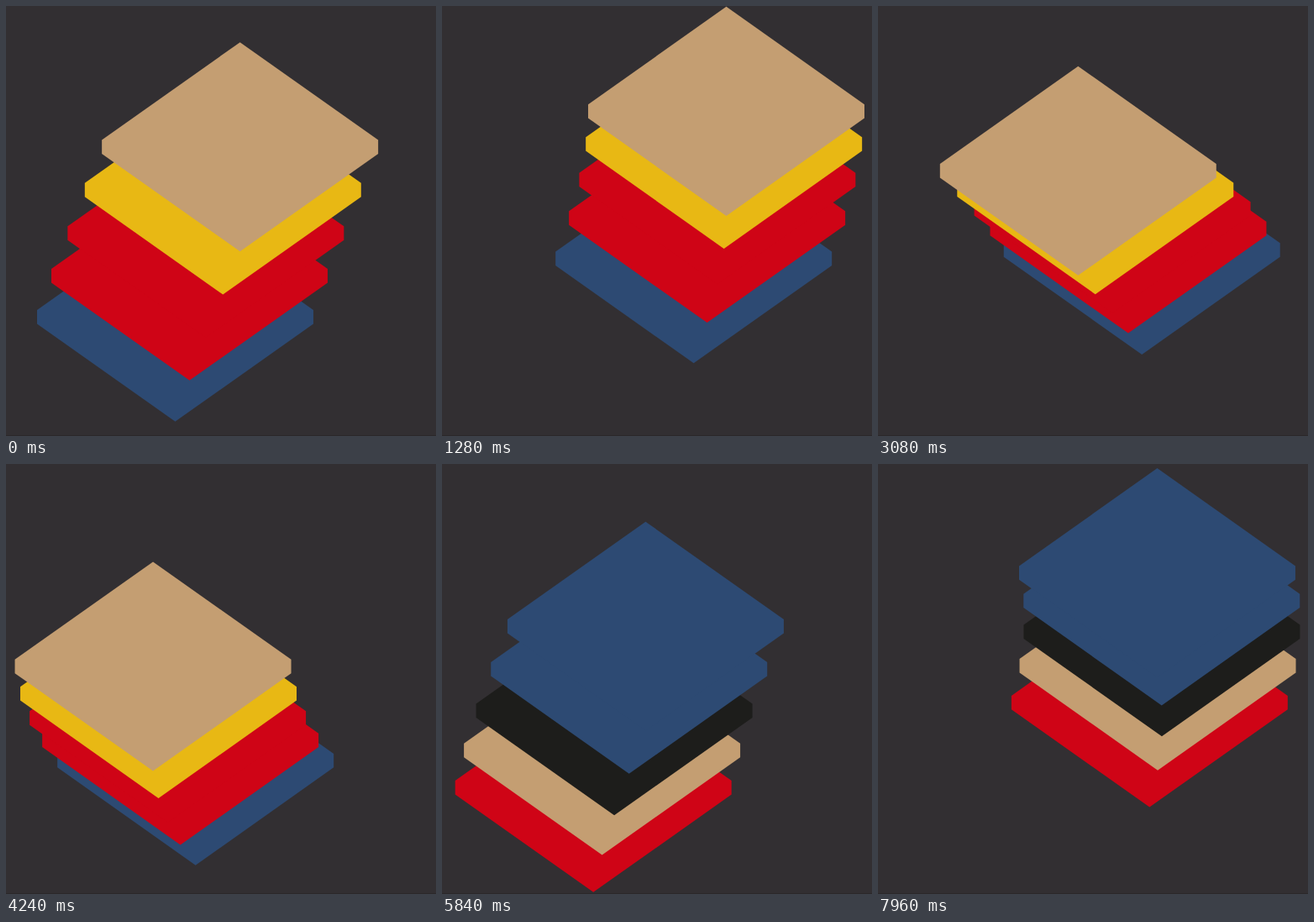
An HTML page that plays this animation: 512x512 px, repeating every 8000 ms.

```html
<!DOCTYPE html>
<html lang="en">
<head>
<meta charset="utf-8">
<title>Sliding tiles</title>
<style>
  html, body { margin: 0; width: 100%; height: 100%; overflow: hidden; background: #322f32; }
  svg { display: block; width: 100%; height: 100%; }
</style>
</head>
<body>
<svg id="stage" viewBox="0 0 512 512">
  <rect y="511" width="512" height="1" fill="#2b282a"/>
</svg>
<script>
(() => {
  const LOOP = 8;             // seconds
  const SLOPE = Math.SQRT1_2; // isometric edge slope
  const CENTER = { x: 256, y: 183.7 };
  const SWING = 82.5;
  const GAP = 37;             // vertical distance between layers
  const PHASE = 0.277;
  const LAG = 0.25;           // phase delay per layer
  const TURN = 4.69;          // phase at which a tile takes its second colour

  const tan = '#c49e72', yellow = '#e8b814', red = '#cf0416', blue = '#2d4a73', black = '#1d1d1b';
  const before = [tan, yellow, red, red, blue];
  const after = [blue, blue, black, tan, red];

  const halfWidth = 164.5, side = 8.2;
  const halfHeight = halfWidth * SLOPE + side;
  const outline = [
    [0, -halfHeight], [halfWidth, -side], [halfWidth, side],
    [0, halfHeight], [-halfWidth, side], [-halfWidth, -side]
  ].join(' ');

  const stage = document.getElementById('stage');
  const tiles = before.map(() => {
    const tile = document.createElementNS(stage.namespaceURI, 'polygon');
    tile.setAttribute('points', outline);
    return tile;
  });
  stage.append(...[...tiles].reverse());

  function draw(time) {
    tiles.forEach((tile, i) => {
      const angle = time + PHASE - LAG * i;
      const dx = SWING * Math.sin(angle);
      const x = CENTER.x + dx;
      const y = CENTER.y - dx * SLOPE + GAP * i;
      tile.setAttribute('transform', `translate(${x} ${y})`);
      tile.setAttribute('fill', (angle < TURN ? before : after)[i]);
    });
  }

  const start = performance.now();
  function tick() {
    draw((performance.now() - start) / 1000 % LOOP);
    requestAnimationFrame(tick);
  }
  tick();
})();
</script>
</body>
</html>
```
